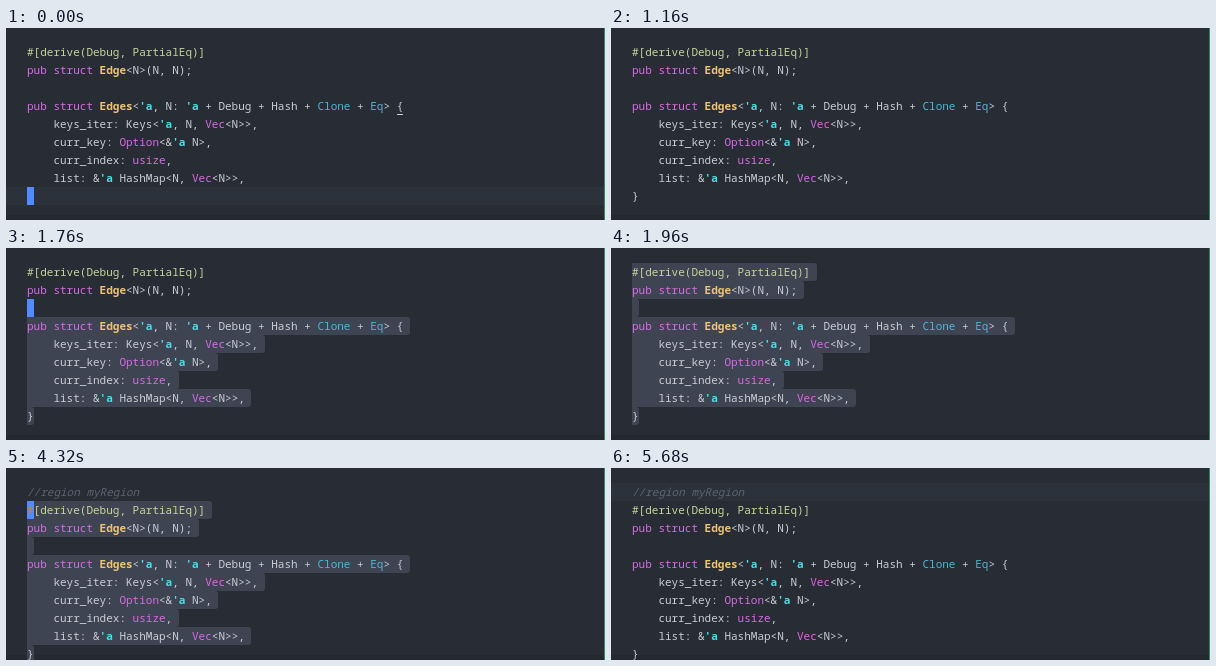
Animation of 599x192 px, one loop 5.72 s. Source, as an HTML page:

```html
<!DOCTYPE html>
<html lang="en">
<head>
<meta charset="utf-8">
<title>Code region</title>
<style>
  html, body { margin: 0; width: 100%; height: 100%; overflow: hidden; background: #282c34; }
  #stage { position: relative; width: 599px; height: 192px; overflow: hidden; background: #282c34; }
  #stage div { position: absolute; }
  #foot { left: 0; top: 187px; width: 599px; height: 5px; background: #24282f; }
  #edge { right: 0; top: 0; width: 1px; height: 192px; background: #2f8a58; }
  #current { left: 0; width: 599px; height: 18px; background: #2c323b; }
  #caret { left: 21px; width: 7px; height: 18px; background: #528bff; }
  #brace { left: 391px; top: 86px; width: 6px; height: 1px; background: #c8cdd6; }
  .line, #caret {
    font: 11px/18px "Noto Sans Mono", "DejaVu Sans Mono", monospace;
    font-variant-ligatures: none; white-space: pre; color: #c8cdd6;
  }
  .line { left: 21px; height: 18px; }
  .sel { left: 21px; height: 18px; border-radius: 0 3px 3px 0; }
  #caret { color: #c9803f; }
  .k { color: #d56ce4; }
  .t { color: #efc474; font-weight: 600; }
  .l { color: #4fdce6; font-weight: 600; }
  .c { color: #4eb6d2; }
  .m { color: #c7d39a; }
  .r { color: #5c6370; font-style: italic; }
</style>
</head>
<body>
<div id="stage">
  <div id="foot"></div>
  <div id="current"></div>
  <div id="selection"></div>
  <div id="code"></div>
  <div id="brace"></div>
  <div id="caret"></div>
  <div id="edge"></div>
</div>
<script>
const LOOP = 5720, TOP = 15, ROW = 18, CHAR = 6.6;
const INSERT = 4320, DESELECT = 4520;

// {style:text} marks a coloured token.
const source = [
  "{m:#[derive(Debug, PartialEq)]}",
  "{k:pub struct} {t:Edge}<N>(N, N);",
  "",
  "{k:pub struct} {t:Edges}<{l:'a}, N: {l:'a} + Debug + Hash + {c:Clone} + {c:Eq}> {",
  "    keys_iter: Keys<{l:'a}, N, {k:Vec}<N>>,",
  "    curr_key: {k:Option}<&{l:'a} N>,",
  "    curr_index: {k:usize},",
  "    list: &{l:'a} HashMap<N, {k:Vec}<N>>,",
  "}"
];

const $ = id => document.getElementById(id);
const rowTop = row => TOP + (row - 1) * ROW + "px";
const show = (el, on) => { el.style.visibility = on ? "visible" : "hidden"; };

function addDiv(parent, className) {
  const el = document.createElement("div");
  el.className = className;
  return parent.appendChild(el);
}

function addLine(text) {
  const el = addDiv($("code"), "line");
  const html = text.replace(/&/g, "&amp;").replace(/</g, "&lt;");
  el.innerHTML = html.replace(/\{(\w):([^}]*)\}/g, '<span class="$1">$2</span>');
  return el;
}

const region = addLine("{r://region myRegion}");
region.style.top = rowTop(1);
const lines = source.map(addLine);
const selections = lines.map((line, i) => {
  const el = addDiv($("selection"), "sel");
  const newline = i < lines.length - 1 ? 1 : 0;
  el.style.width = (line.textContent.length + newline) * CHAR + "px";
  return el;
});

// Row 11 lies below the visible area.
function caretRow(t) {
  if (t < 800) return 9;
  if (t < 840) return 10;
  if (t < 1360) return 11;
  if (t < 1400) return 10;
  if (t < 1560) return 9;
  if (t < 1600) return 8;
  if (t < INSERT) return Math.max(1, 7 - Math.floor((t - 1600) * 0.03 + 1e-6));
  return t < 4680 ? 2 : 1;
}

function caretOn(t) {
  const blink = start => Math.floor((t - start) / 200) % 2 === 0;
  if (t < 760) return blink(-40);
  if (t < 1960) return true;
  if (t < INSERT) return t >= 2160 && t < 2320;
  return t < 4680 || blink(4680);
}

function render(t) {
  const row = caretRow(t);
  const shift = t >= INSERT ? 1 : 0;
  const selecting = t >= 1400 && t < DESELECT;
  const dimmed = t >= 2320 && t < INSERT;

  show(region, shift);
  lines.forEach((line, i) => {
    const lineRow = i + 1 + shift;
    line.style.top = rowTop(lineRow);
    const sel = selections[i];
    sel.style.top = rowTop(lineRow);
    sel.style.background = dimmed ? "#31363f" : "#3e4451";
    show(sel, selecting && lineRow >= row);
  });

  $("current").style.top = $("caret").style.top = rowTop(row);
  show($("current"), !selecting && row !== 10);
  show($("caret"), caretOn(t));
  $("caret").textContent = shift && row === 2 ? "#" : "";
  show($("brace"), t < 800);
}

const start = performance.now();
function tick(now) {
  render(Math.max(0, now - start) % LOOP);
  requestAnimationFrame(tick);
}
render(0);
requestAnimationFrame(tick);
</script>
</body>
</html>
```
